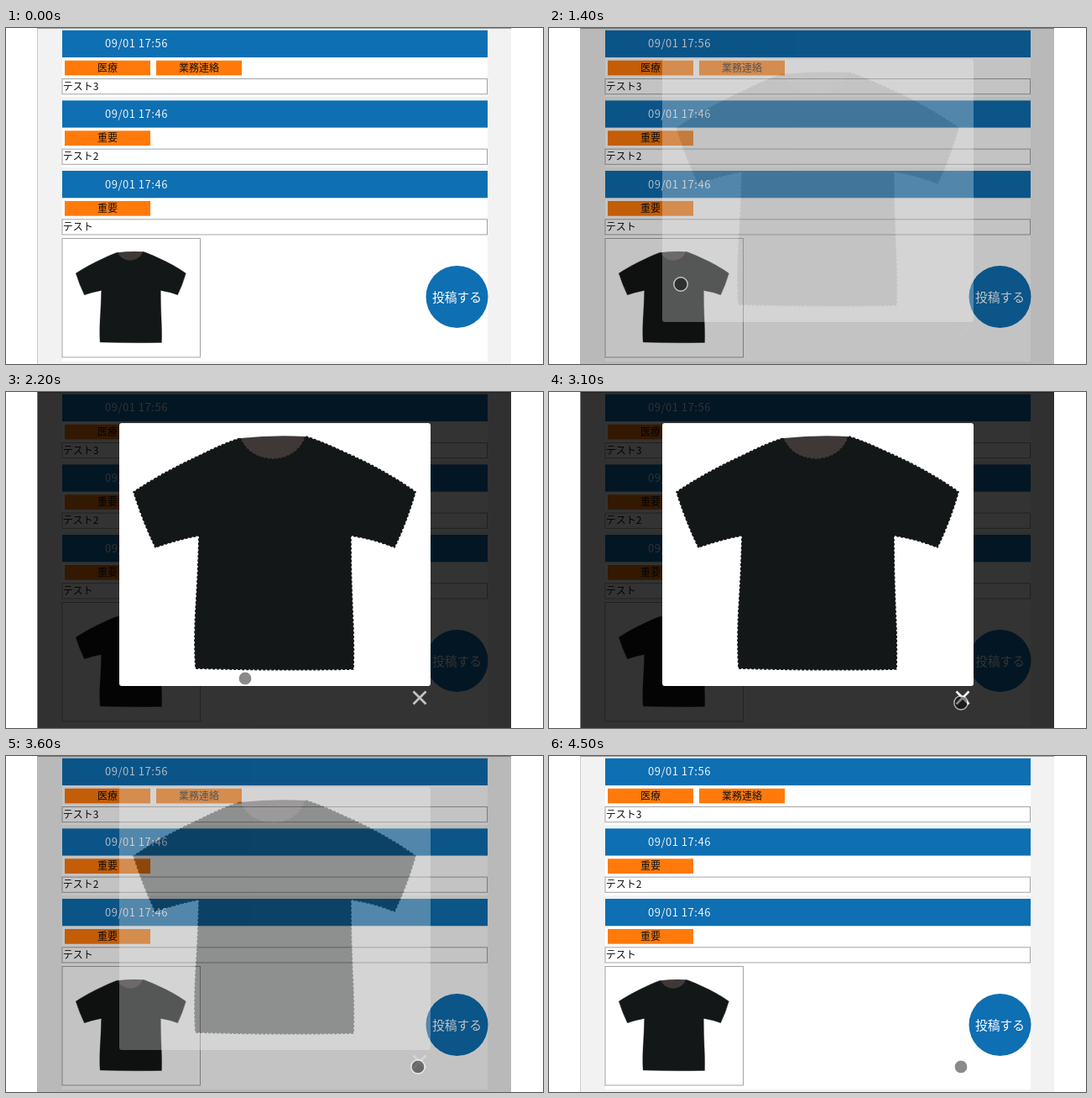
Animation, 640 px wide and 400 px high, one loop 4.6 s. Source, as an HTML page:

```html
<!DOCTYPE html>
<html lang="ja">
<head>
<meta charset="utf-8">
<title>投稿一覧</title>
<style>
  html, body { margin: 0; width: 100%; height: 100%; overflow: hidden; background: #fff; }
  svg { display: block; width: 640px; height: 400px; }
  text { font: 12px "Noto Sans CJK JP", "Noto Sans CJK", sans-serif; fill: #111; }
  .date { font-size: 13px; letter-spacing: .5px; fill: #eef4f9; }
  .mid { text-anchor: middle; }
  .post { font-size: 14.7px; fill: #fff; }
  .bar { fill: #0e6fb2; }
  .tag { fill: #ff7a0a; }
  .frame { fill: #fff; stroke: #a3a3a3; }

  .anim {
    animation: 4600ms linear infinite paused;
    animation-delay: var(--clock, 0ms);
  }
  .shade, .modal { animation-name: fade; }
  .photo { animation-name: photo; }
  .close { animation-name: close; }
  .hover { animation-name: hover; }
  .target { animation-name: target; }
  .touch { animation-name: touch; }
  .path { animation-name: path; }

  /* sine ease in and out */
  @keyframes fade {
    0%, 25.652% { opacity: 0; animation-timing-function: cubic-bezier(.37, 0, .63, 1); }
    38.696% { opacity: 1; }
    70% { opacity: 1; animation-timing-function: cubic-bezier(.37, 0, .63, 1); }
    83.043%, 100% { opacity: 0; }
  }
  @keyframes photo {
    0%, 26.087% { opacity: 0; animation-timing-function: cubic-bezier(.37, 0, .63, 1); }
    39.13%, 100% { opacity: 1; }
  }
  @keyframes close {
    0%, 26.087% { opacity: 0; animation-timing-function: cubic-bezier(.37, 0, .63, 1); }
    41.304%, 100% { opacity: 1; }
  }
  @keyframes hover {
    0%, 58.6% { opacity: .7; }
    58.7%, 100% { opacity: .95; }
  }
  @keyframes target {
    0%, 15.2% { opacity: 0; }
    15.21%, 26% { opacity: 1; }
    26.01%, 100% { opacity: 0; }
  }
  @keyframes touch {
    0%, 26% { opacity: 0; }
    26.01%, 100% { opacity: 1; }
  }
  @keyframes path {
    0%, 39.13% { transform: translate(157px, 305px); animation-timing-function: ease-in; }
    47.826% { transform: translate(285px, 341px); animation-timing-function: ease-out; }
    60.87%, 100% { transform: translate(491px, 370px); }
  }
</style>
</head>
<body>
<svg viewBox="0 0 640 400">
  <defs>
    <g id="shirt">
      <path fill="#3e3937" d="M279 55Q318 51 357 53L362 84H276Z"/>
      <path fill="#141717" stroke="#141717" stroke-width="1.6" stroke-dasharray="3 2" stroke-linejoin="round"
        d="M279 55Q290 79 319 80Q348 78 357 53Q372 57 404 72Q452 93 488 119Q478 154 463 185Q438 175 411 171
           Q411 215 413 260Q415 300 414 330Q320 332 226 329Q224 300 226 260Q229 215 230 171Q203 176 178 185
           Q163 154 152 119Q188 95 232 75Q262 60 279 55Z"/>
    </g>
    <path id="arrow" d="M0-2.2V-5M-2.3-3.4L0-5.8L2.3-3.4"/>
  </defs>

  <rect x="37" width="565" height="400" fill="#f2f2f2"/>
  <rect x="37" width="1" height="400" fill="#ccc"/>
  <rect x="37" width="565" height="1" fill="#a0a0a0"/>

  <g id="posts"></g>
  <rect class="frame" x="67" y="250.5" width="164.5" height="141.5"/>
  <use href="#shirt" transform="translate(24 245.7) scale(.39)"/>
  <circle class="bar" cx="537.5" cy="320" r="37"/>
  <text class="mid post" x="537.5" y="325.6">投稿する</text>

  <rect class="anim shade" x="37.5" width="564.5" height="400" fill-opacity=".8"/>
  <g class="anim modal">
    <rect x="135" y="37" width="371" height="313" rx="3" fill="#fff"/>
    <use class="anim photo" href="#shirt"/>
    <g class="anim close">
      <path class="anim hover" d="M485.5 356.5L500.5 371.5M500.5 356.5L485.5 371.5" stroke="#fff" stroke-width="2.8"/>
    </g>
  </g>

  <g class="anim path">
    <g class="anim target" fill="none" stroke="#c8c8c8" stroke-width=".9">
      <use href="#arrow"/>
      <use href="#arrow" transform="rotate(90)"/>
      <use href="#arrow" transform="rotate(180)"/>
      <use href="#arrow" transform="rotate(270)"/>
      <circle r="3.9" stroke-dasharray="2 4.12" stroke-dashoffset="-2"/>
    </g>
    <g class="anim touch">
      <circle r="7.5" fill-opacity=".46"/>
      <circle r="8.2" fill="none" stroke="#fff" stroke-opacity=".65" stroke-width="1.4"/>
    </g>
  </g>
</svg>
<script>
  const posts = [
    { y: 2.7, end: 82, date: '09/01 17:56', tags: ['医療', '業務連絡'], body: 'テスト3' },
    { y: 86.3, end: 166, date: '09/01 17:46', tags: ['重要'], body: 'テスト2' },
    { y: 170, end: 397, date: '09/01 17:46', tags: ['重要'], body: 'テスト' }
  ];

  const tag = (name, i) => `
    <rect class="tag" x="${70 + i * 109}" y="36" width="102" height="17.7"/>
    <text class="mid" x="${121 + i * 109}" y="49.2">${name}</text>`;

  document.getElementById('posts').innerHTML = posts.map(p => `
    <g transform="translate(0 ${p.y})">
      <rect x="67" width="507" height="${p.end - p.y}" fill="#fff"/>
      <rect class="bar" x="67" width="507" height="32.3"/>
      <text class="date" x="118" y="20.6">${p.date}</text>
      ${p.tags.map(tag).join('')}
      <rect class="frame" x="67" y="57.8" width="506.5" height="18.2"/>
      <text x="67.7" y="71.2">${p.body}</text>
    </g>`).join('');

  const LOOP = 4600, STEP = 100;
  function tick() {
    const t = Math.floor((performance.now() + 8) / STEP) * STEP % LOOP;
    document.documentElement.style.setProperty('--clock', -t + 'ms');
    requestAnimationFrame(tick);
  }
  tick();
</script>
</body>
</html>
```
